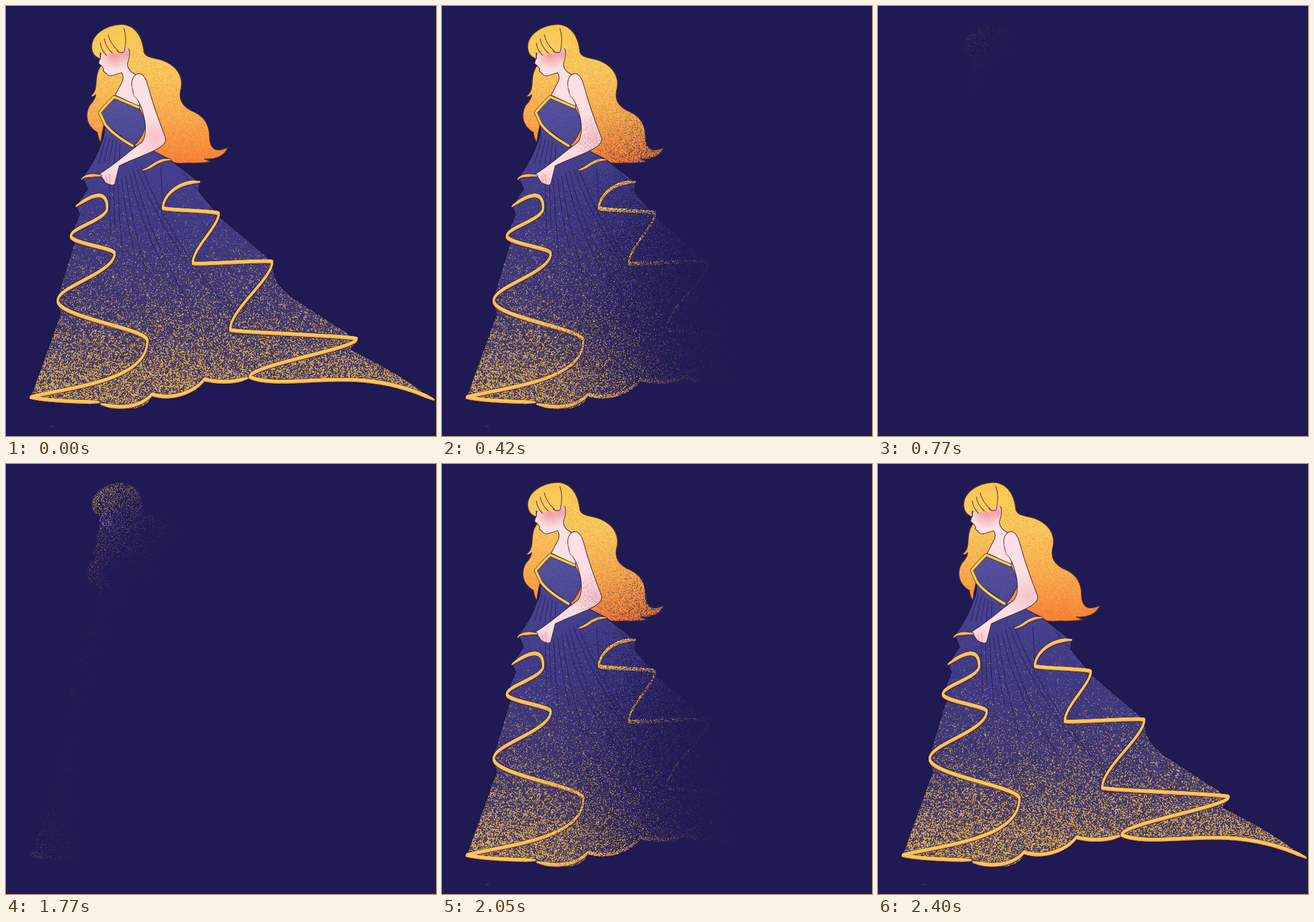
Write an HTML page with a canvas that moves like this. It is 748x748 px and loops after 3400 ms.

```html
<!DOCTYPE html>
<html lang="en">
<head>
<meta charset="utf-8">
<title>Dissolving gown</title>
<style>
html, body { margin: 0; width: 100%; height: 100%; overflow: hidden; background: #201a54; }
canvas { display: block; width: 100vw; height: 100vh; }
</style>
</head>
<body>
<canvas id="stage" width="748" height="748"></canvas>
<script>
const SIZE = 748, STEP = 70, LOOP = 3400;
const stage = document.getElementById('stage').getContext('2d');
const artCanvas = document.createElement('canvas');
artCanvas.width = artCanvas.height = SIZE;
const art = artCanvas.getContext('2d', { willReadFrequently: true });
art.lineCap = art.lineJoin = 'round';

const clamp = (v, lo = 0, hi = 1) => Math.min(hi, Math.max(lo, v));
const smooth = v => v * v * (3 - 2 * v);

let seed = 41;
function random() {
  seed = (seed + 0x6D2B79F5) | 0;
  let r = Math.imul(seed ^ (seed >>> 15), 1 | seed);
  r = (r + Math.imul(r ^ (r >>> 7), 61 | r)) ^ r;
  return ((r ^ (r >>> 14)) >>> 0) / 4294967296;
}
const makeNoise = () => Float32Array.from({ length: SIZE * SIZE }, random);

function fill(path, style) {
  art.fillStyle = style;
  art.fill(new Path2D(path));
}
function line(path, color, width = 1.3, dash = []) {
  art.strokeStyle = color;
  art.lineWidth = width;
  art.setLineDash(dash);
  art.stroke(new Path2D(path));
}
const sketch = (path, color) => line(path, color, 1.5, [5, 1, 3, 1]);

function vertical(y0, y1, ...colors) {
  const g = art.createLinearGradient(0, y0, 0, y1);
  colors.forEach((color, i) => g.addColorStop(i / (colors.length - 1), color));
  return g;
}
function blush(path, x, y, radius, alpha) {
  const g = art.createRadialGradient(x, y, 0, x, y, radius);
  g.addColorStop(0, `rgba(236,132,142,${alpha})`);
  g.addColorStop(1, 'rgba(236,132,142,0)');
  fill(path, g);
}

// Swings from fold to fold; every fold is a vertical turning point
function swing(folds, handle) {
  let path = '';
  for (let i = 1; i < folds.length; i++) {
    const [x0, y0] = folds[i - 1], [x1, y1] = folds[i];
    const drop = Math.max(y1 - y0, 16);
    path += `C${x0} ${y0 + drop * handle} ${x1} ${y1 - drop * 0.3} ${x1} ${y1}`;
  }
  return path;
}

// A broad nib makes the ribbon thicker where it runs sideways
function ribbon(path, scale = 1) {
  const guide = document.createElementNS('http://www.w3.org/2000/svg', 'path');
  guide.setAttribute('d', path);
  const length = guide.getTotalLength(), samples = [];
  for (let s = 0; s < length; s += 0.7) {
    const { x, y } = guide.getPointAtLength(s);
    samples.push({ x, y, size: scale * (0.5 + 0.5 * clamp(Math.min(s, length - s) / 16)) });
  }
  const layer = (color, dy, extra) => {
    art.fillStyle = color;
    for (const { x, y, size } of samples) {
      art.beginPath();
      art.ellipse(x, y + dy, 1.9 * size + extra, 3.2 * size + extra, 0.25, 0, 7);
      art.fill();
    }
  };
  layer('rgba(36,24,60,.75)', 0.5, 0.8);
  layer('#ee9a48', 0.5, 0);
  layer('#fbc75c', -0.5, -0.5);
}

const CROWN = 'M149 70C150 47 177 32 203 32C226 34 238 55 240 80';
const HAIR = CROWN + `C244 92 262 89 278 97C300 107 309 126 304 146C300 164 308 174 322 182
  C346 191 354 208 354 228C355 248 364 256 386 246Q377 268 345 266L357 271Q335 274 319 273
  C295 274 282 274 270 262L222 243L205 155L171 205Q167 220 165 237Q161 233 159 220
  C137 207 138 186 146 172Q155 163 156 154Q152 159 146 157C164 146 150 123 166 103L163 92Q149 87 149 70Z`;
const SKIRT = `M171 205Q173 225 165 240Q156 268 133 298L142 318L122 348L128 362L113 399L119 410
  L88 512L95 535Q72 600 42 682L160 689Q240 718 255 677Q320 692 345 651Q385 662 423 649
  Q600 650 660 660Q705 670 745 687Q690 641 600 598L612 581L500 508Q466 482 466 462L462 443L372 367
  L335 322L337 307L285 267L250 249L222 243Z`;
const BODICE = 'M188 157L231 176Q239 188 243 208Q239 227 222 244Q185 222 171 204L163 184Z';
const FACE = `M166 80L161 100L166 104L170 109L169 113L174 117Q178 123 185 121L201 116Q205 121 203 130
  L190 155L232 175L239 122L225 119Q212 113 211 101Q217 85 214 75Q209 69 205 74Z`;
const ARM = `M219 140C217 124 226 116 234 118C243 121 246 135 251 153C259 181 266 198 277 228
  C286 248 229 261 197 278L189 310Q185 314 173 307L163 292C195 272 217 250 235 238
  C252 222 237 166 223 157Z`;
const BANGS = `M149 70C150 47 177 32 203 32C219 34 228 48 225 75L213 74Q208 69 205 80
  Q199 82 193 78L196 85Q188 84 182 78L185 85Q176 84 171 77L175 87L164 81V92Q149 87 149 70Z`;

function drawCloth() {
  fill(HAIR, vertical(32, 272, '#f9c852', '#fcc45b', '#fba94c', '#fa8035'));
  sketch(HAIR, '#4a3038');
  fill(SKIRT, vertical(205, 690, '#4b4693', '#3f3a85', '#3c3470', '#4b3c60'));
  fill(BODICE, vertical(157, 244, '#56529e', '#4b4791'));
}

// Fine grain everywhere, gold dust thickening towards the hem
function addGrain() {
  const noise = makeNoise(), image = art.getImageData(0, 0, SIZE, SIZE), px = image.data;
  for (let i = 0; i < noise.length - SIZE - 1; i++) {
    const p = i * 4, y = i / SIZE | 0;
    if (!px[p + 3]) continue;
    const shade = 1 + (noise[i] - 0.5) * 0.18;
    const clump = (noise[i] + noise[i + 1] + noise[i + SIZE] + noise[i + SIZE + 1]) / 4;
    const depth = clamp((y - 310) / 340);
    const gold = depth && clamp((clump - 0.73 + 0.31 * depth) * 5) * (0.5 + 0.4 * depth);
    [232, 184, 86].forEach((c, k) => {
      const base = px[p + k] * shade;
      px[p + k] = base + (c - base) * gold;
    });
  }
  art.putImageData(image, 0, 0);
}

function drawPleats() {
  const ink = 'rgba(31,24,72,.65)';
  sketch(SKIRT, 'rgba(25,18,55,.8)');
  line(BODICE, ink);
  for (let i = 0; i < 9; i++) {
    const x = 180 + 7 * i, y = 312 - 4 * i;
    const endX = 182 + 5 * i + 2.7 * i * i, endY = 400 + 17 * i - 30 * (i % 2);
    line(`M${x} ${y}Q${x + (endX - x) * 0.3} ${(y + endY) / 2} ${endX} ${endY}`, ink);
  }
  for (let i = 0; i < 5; i++) line(`M${174 + 6 * i} ${228 + 3 * i}L${161 + 9 * i} 274`, ink);
  line('M246 588Q250 610 244 630M159 658L163 690M269 282L273 344M309 291L333 320', ink);
}

function drawFigure() {
  const ink = '#49283d';
  fill(FACE, '#fbe0e3');
  blush(FACE, 190, 82, 30, 0.85);
  blush(FACE, 211, 84, 14, 0.6);
  line(FACE, ink, 1.1);
  fill(ARM, '#fce0e3');
  blush(ARM, 262, 230, 42, 0.32);
  blush(ARM, 180, 302, 18, 0.28);
  line(ARM, ink, 1.1);
  line('M219 140Q218 151 228 163M173 296L176 307M180 293L181 309', '#e8a0aa');
  fill(BANGS, vertical(32, 92, '#f8c74e', '#fccb65'));
  sketch(CROWN + 'M149 70Q149 87 164 92V81', '#4a3038');
  line('M205 39Q211 55 206 79M193 78Q199 83 205 80', ink, 1.1);
  for (let i = 0; i < 3; i++) {
    const x = 164 + 7 * i, y = 64 - 7 * i;
    line(`M${x} ${y}Q${x + 2} ${y + 14} ${x + 11 + 3 * i} ${86 - 4 * i}`, ink, 1.1);
  }
}

function drawTrim() {
  const edge = 'M220 243Q185 223 172 205L163 185Q177 169 188 158L230 176';
  line(edge, '#392b3c', 6);
  line(edge, '#e3a940', 4.6);
  line(edge, '#f8cd50', 3);

  const leftFolds = [[176, 351], [113, 400], [189, 430], [90, 512], [246, 582]];
  const rightFolds = [[273, 351], [370, 361], [325, 447], [463, 445], [390, 563], [610, 579], [424, 645]];
  ribbon('M132 301Q136 293 166 295', 0.75);
  ribbon('M238 285C256 281 260 267 286 267', 0.75);
  ribbon('M122 348C137 337 176 311 176 351' + swing(leftFolds, 0.42) +
    'C245 652 116 662 43 680Q70 687 163 689');
  ribbon('M165 692C210 704 240 692 254 675C290 687 330 670 345 649Q385 659 423 646');
  ribbon('M337 306C300 304 273 330 273 351' + swing(rightFolds, 0.25) +
    'C460 661 530 648 601 650Q680 653 745 685');
  fill('M76 731h6v1h-6Z', '#4a4066');
}

drawCloth();
addGrain();
drawPleats();
drawFigure();
drawTrim();

// The fade spreads outward from a point on the right edge
const source = art.getImageData(0, 0, SIZE, SIZE);
const frame = new ImageData(SIZE, SIZE);
frame.data.set(source.data);
const grain = makeNoise();
const distance = grain.map((_, i) => Math.hypot(i % SIZE - SIZE, (i / SIZE | 0) - 560));

function dissolve(level) {
  const start = 93 * level - 260, reach = 500, softness = 0.6;
  for (let i = 0; i < grain.length; i++) {
    const alpha = source.data[i * 4 + 3];
    if (!alpha) continue;
    const keep = level ? smooth(clamp((distance[i] - start) / reach)) : 1;
    frame.data[i * 4 + 3] = alpha * clamp((keep * (1 + softness) - grain[i]) / softness);
  }
  stage.putImageData(frame, 0, 0);
}

const began = performance.now();
let shown = -1;
function play() {
  const t = (performance.now() - began) % LOOP;
  const step = Math.floor(t / STEP);
  const level = t < 1770 ? clamp(step - 1, 0, 10) : clamp(10 - Math.floor((t - 1700) / STEP), 0, 10);
  if (level !== shown) dissolve(shown = level);
  requestAnimationFrame(play);
}
play();
</script>
</body>
</html>
```
